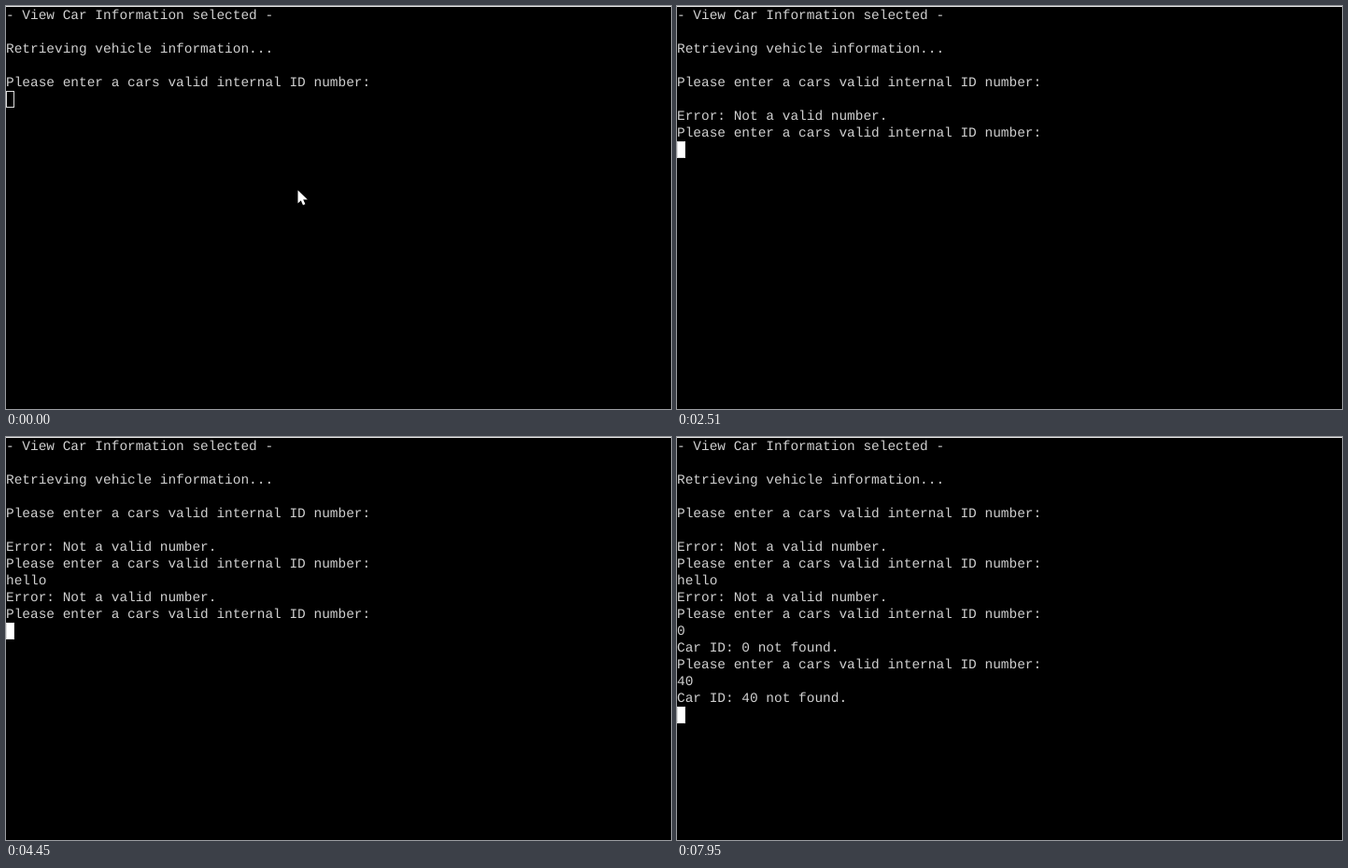
These frames come from a looping animation (712 by 432 pixels, 8 s). An HTML page with a canvas:

```html
<!DOCTYPE html>
<html lang="en">
<head>
<meta charset="utf-8">
<title>Terminal session</title>
<style>
  html, body { margin: 0; width: 100%; height: 100%; overflow: hidden; background: #000; }
  canvas { display: block; }
</style>
</head>
<body>
<canvas id="stage" width="712" height="432"></canvas>
<script>
const ctx = document.getElementById("stage").getContext("2d");
const LOOP = 8000, CELL = 8.67, ROW = 18;
const PROMPT = "Please enter a cars valid internal ID number:\n";
const ERROR = "Error: Not a valid number.\n";
const notFound = id => `Car ID: ${id} not found.\n`;

// [time in ms, text appended to the terminal]
const output = [
  [0, "- View Car Information selected -\n\nRetrieving vehicle information...\n\n" + PROMPT],
  [1350, "\n" + ERROR], [1500, PROMPT],
  [2890, "h"], [3090, "e"], [3280, "l"], [3440, "l"], [3660, "o"],
  [3870, "\n" + ERROR], [4160, PROMPT],
  [5540, "0"], [6010, "\n" + notFound(0)], [6110, PROMPT],
  [7410, "4"], [7530, "0"], [7950, "\n" + notFound(40)]
];

// [time in ms, x, y] of the pointer tip
const pointer = [[0, 312, 197], [200, 306, 189], [250, 299, 178], [310, 296, 173]];
const FOCUS = 310, POINTER_HIDDEN = 2310;
const arrow = new Path2D("M0.5 0.5V14.5L3.8 11.4L6 16.4L8.4 15.3L6.2 10.5H10.8Z");

function drawText(lines) {
  ctx.font = '14.45px "Courier New", "Liberation Mono", monospace';
  ctx.textRendering = "geometricPrecision";
  ctx.fillStyle = "#d0d0d0";
  lines.forEach((line, row) => {
    [...line].forEach((char, col) => ctx.fillText(char, col * CELL, 14 + row * ROW));
  });
}

function drawCaret(lines, focused) {
  const row = lines.length - 1;
  const x = Math.round(lines[row].length * CELL), y = 1 + row * ROW;
  ctx.fillStyle = "#fff";
  ctx.strokeStyle = "#dcdcdc";
  ctx.lineWidth = 1;
  if (focused) ctx.fillRect(x, y, 9, ROW);
  ctx.strokeRect(x + 0.5, y + 0.5, 8, ROW - 1);
}

function drawPointer(t) {
  const [, x, y] = pointer.findLast(p => p[0] <= t);
  ctx.save();
  ctx.translate(x, y);
  ctx.fillStyle = "#fff";
  ctx.fill(arrow);
  ctx.restore();
}

function draw(t) {
  ctx.fillStyle = "#000";
  ctx.fillRect(0, 0, 712, 432);
  ctx.fillStyle = "#e8e8e8";
  ctx.fillRect(0, 0, 712, 1);
  const lines = output.filter(o => o[0] <= t).map(o => o[1]).join("").split("\n");
  drawText(lines);
  drawCaret(lines, t >= FOCUS);
  if (t < POINTER_HIDDEN) drawPointer(t);
}

const start = performance.now();
function tick() {
  draw((performance.now() - start) % LOOP);
  requestAnimationFrame(tick);
}
tick();
</script>
</body>
</html>
```
